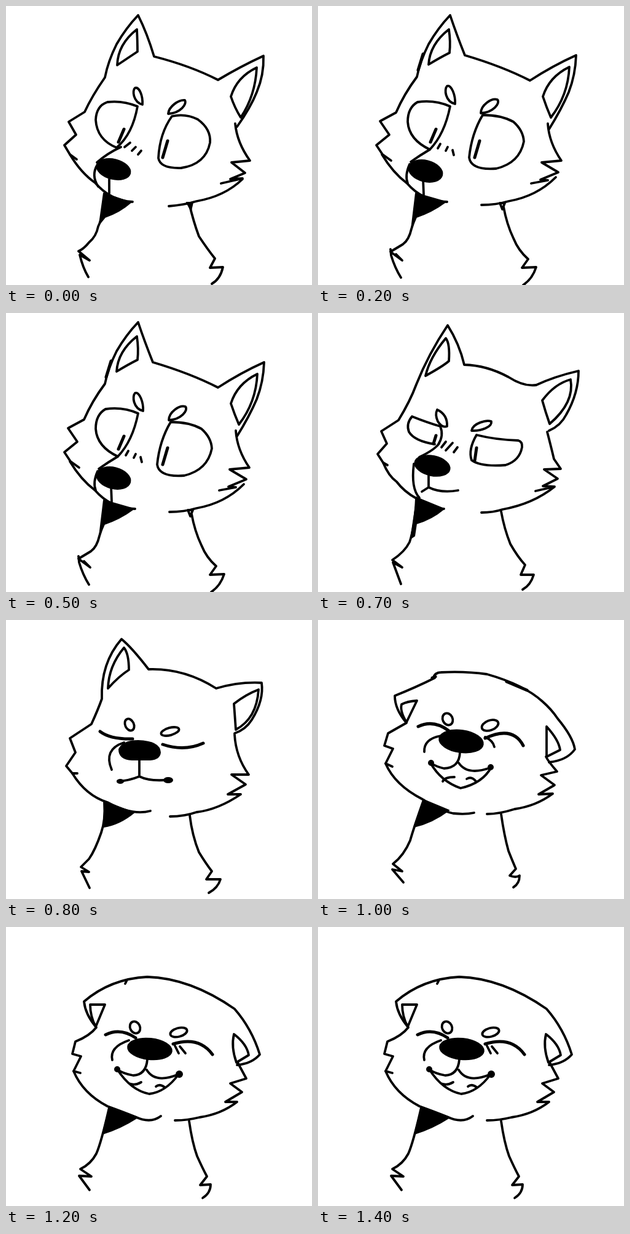
Animation of 498 by 453 pixels, one loop 1.5 s. Source, as an HTML page:

```html
<!DOCTYPE html>
<html lang="en">
<head>
<meta charset="utf-8">
<title>Wolf</title>
<style>
  html, body { margin: 0; width: 100%; height: 100%; overflow: hidden; background: #fff; }
  svg { display: block; width: 100vw; height: 100vh; }
  g { fill: none; stroke: #000; stroke-width: 3.8; stroke-linecap: round; stroke-linejoin: round; }
  .ink { fill: #000; stroke-width: 2; }
  .bold { stroke-width: 5; }
  .off { display: none; }
</style>
</head>
<body>
<svg viewBox="0 0 498 453">
  <!-- looking down -->
  <g>
    <path d="M115 249L104 241L95 226L114 209L102 188L128 172Q140 146 161 116Q166 90 180 62Q195 36 215 15Q230 45 241 82Q300 97 345 120Q382 98 419 81Q420 112 408 140Q398 165 376 196"/>
    <path d="M213 38Q214 58 214 74L181 96Q182 62 213 38ZM408 100Q406 145 382 181Q372 165 366 147Q376 115 408 100Z"/>
    <path d="M373 191Q376 222 397 251L367 254L389 271L365 281L385 280L350 288M385 281Q356 309 310 317Q290 323 265 325M104 241Q122 271 145 287Q170 316 206 318"/>
    <path d="M222 160C207 156 205 137 210 133C217 131 223 146 222 160ZM264 175C265 163 281 152 291 153C295 159 284 174 264 175Z"/>
    <path d="M214 163Q190 153 165 156Q147 162 146 185Q148 217 180 230Q206 208 214 163ZM270 179Q292 174 312 184Q334 200 332 222Q325 257 285 263Q251 264 248 247Q250 207 270 179Z"/>
    <path class="bold" d="M192 200L183 221M263 219L255 246"/>
    <path d="M202 222L193 229M211 229L205 235M220 235L215 241M187 229Q165 239 148 254M149 257Q138 275 150 293M168 281V304"/>
    <ellipse class="ink" cx="175" cy="265" rx="28" ry="16" transform="rotate(14 175 265)"/>
    <path class="ink" d="M159 304L203 319Q185 335 161 343L152 354ZM294 319H304L301 332Z"/>
    <path d="M161 304Q159 340 150 358Q147 374 135 384Q126 395 118 398L136 413L120 404Q125 425 134 440M298 320Q305 350 314 374Q328 395 340 410L332 425L353 424Q349 443 335 451"/>
  </g>
  <g>
    <path d="M119 251L105 241L95 226L116 209L101 187L127 173Q140 143 161 115Q166 90 180 62Q195 36 215 15Q225 45 239 80Q300 98 345 121Q382 97 420 80Q419 112 408 140Q396 168 376 200"/>
    <path d="M213 38Q216 58 214 76Q198 84 180 95Q182 62 213 38ZM409 99Q407 145 379 181Q372 165 366 147Q376 115 409 99Z"/>
    <path class="bold" d="M171 78L163 104"/>
    <path d="M374 191Q376 222 396 251L364 254L391 270L362 282L374 283L347 288M387 278Q356 309 310 317Q290 323 266 323M104 241Q122 271 145 288Q170 317 210 318"/>
    <path d="M223 159C207 155 205 135 210 130C217 127 224 145 223 159ZM265 174C265 161 282 149 292 152C297 158 285 173 265 174Z"/>
    <path d="M215 163Q190 152 162 156Q146 165 146 188Q148 217 182 233Q206 208 215 163ZM268 177Q298 177 318 188Q334 202 335 220Q328 255 290 264Q249 267 246 246Q250 207 268 177Z"/>
    <path class="bold" d="M192 200L183 221M263 219L255 246"/>
    <path d="M199 224L195 231M211 229L208 235M219 234L221 242M182 233Q165 243 151 253M149 257Q141 275 146 288M171 281L172 306"/>
    <ellipse class="ink" cx="175" cy="268" rx="28" ry="17" transform="rotate(14 175 268)"/>
    <path class="ink" d="M159 304L208 318Q185 335 160 343L152 362Z"/>
    <path d="M161 304Q159 343 152 362Q148 380 138 387L118 399L137 413L127 403M118 395L119 405Q125 425 135 441M296 320H304L300 330ZM302 326Q307 354 318 377Q326 397 342 411L332 425L355 424Q349 443 334 453"/>
  </g>
  <!-- lids lowering -->
  <g>
    <path d="M113 247L106 243L97 229L112 212L103 192L131 174Q150 143 160 116Q180 66 211 20Q230 50 238 84Q275 85 310 104Q335 120 355 117Q385 103 424 94Q424 130 404 165Q395 183 376 191"/>
    <path d="M208 41Q215 50 213 78Q204 86 175 102Q182 72 208 41ZM411 108Q418 145 377 180Q370 160 365 142Q385 115 411 108Z"/>
    <path d="M373 193Q380 220 384 237L395 253L368 254L390 269L366 281L385 282L354 289M385 282Q350 310 300 319Q285 324 266 324M106 243Q115 265 128 274Q140 290 160 301Q185 317 205 318"/>
    <path d="M194 157Q190 165 195 176Q202 187 210 184Q211 165 194 157ZM250 191C252 179 274 173 282 176C284 185 265 192 250 191Z"/>
    <path d="M190 213Q157 208 148 193Q143 180 153 168Q178 178 199 184Q205 199 196 213M258 198Q290 206 326 207Q333 209 332 218Q328 240 305 247Q265 250 250 239Q244 222 258 198Z"/>
    <path class="bold" d="M192 199L188 212M258 219L255 240"/>
    <path d="M208 209L201 218M219 211L208 223M227 218L221 226M197 212Q190 222 165 234M156 245Q151 285 165 300M180 264V283L169 290M180 283Q200 293 228 288"/>
    <ellipse class="ink" cx="186" cy="248" rx="29" ry="16" transform="rotate(12 186 248)"/>
    <path class="ink" d="M161 300L205 318Q185 335 160 342L157 362L151 366Z"/>
    <path d="M160 300Q158 345 149 372Q141 388 121 401L137 413L122 405L135 440M298 322Q303 350 313 375Q325 396 337 409L330 425L351 425Q346 442 333 449"/>
  </g>
  <!-- eyes shut -->
  <g>
    <path d="M116 249L108 249L98 237L113 215L104 192L139 169Q150 145 156 128Q154 70 188 31Q205 45 232 80Q290 78 342 111Q380 100 416 102Q420 130 400 162Q390 178 372 184"/>
    <path d="M192 45Q200 55 200 81Q184 91 166 111Q167 75 192 45ZM411 113Q390 121 371 136L374 178Q408 160 411 113Z"/>
    <path d="M372 186Q374 222 395 251L367 251L390 267L361 283L382 283Q345 308 310 312Q290 319 267 319M108 249Q130 285 165 296Q205 318 235 310"/>
    <ellipse cx="201" cy="170" rx="7" ry="10" transform="rotate(-25 201 170)"/>
    <ellipse cx="267" cy="181" rx="15" ry="6" transform="rotate(-15 267 181)"/>
    <path class="bold" d="M153 181Q170 194 206 193M255 202Q290 214 321 200"/>
    <path class="ink" d="M184 210Q190 196 215 196Q250 197 251 215Q250 226 235 227H205Q184 226 184 210Z"/>
    <path d="M192 199Q158 210 172 243M217 227V254M182 262Q200 261 217 254Q235 263 269 259"/>
    <ellipse class="ink" cx="186" cy="262" rx="5" ry="3"/>
    <ellipse class="ink" cx="264" cy="260" rx="7" ry="4"/>
    <path class="ink" d="M161 295L208 313Q185 332 159 336Z"/>
    <path d="M160 296Q162 325 155 345Q145 374 135 388L122 401L135 409L123 408L136 435M299 317Q303 350 314 377Q325 395 335 408L326 421L349 421Q345 435 330 443"/>
  </g>
  <!-- grin -->
  <g>
    <path d="M121 238L110 233L122 209L108 204L114 184L144 167Q125 145 125 123Q160 109 190 94M187 95Q190 85 200 85Q240 83 275 88Q335 105 365 132Q380 145 390 160Q415 190 418 210Q405 228 376 231"/>
    <path d="M161 131L144 166Q133 148 136 137Q145 132 161 131ZM372 173Q392 195 394 211L372 222Z"/>
    <path class="bold" d="M307 100L340 114M186 94L191 92"/>
    <path d="M371 222Q375 230 389 246L363 252L385 268L359 283L382 282Q355 302 320 307Q295 315 275 315M110 233Q125 268 170 291Q200 310 220 314Q240 316 254 313"/>
    <ellipse cx="211" cy="161" rx="8" ry="10" transform="rotate(-25 211 161)"/>
    <ellipse cx="280" cy="171" rx="14" ry="8" transform="rotate(-20 280 171)"/>
    <path class="bold" d="M163 173Q188 161 213 180M272 192Q317 171 334 204"/>
    <ellipse class="ink" cx="233" cy="197" rx="36" ry="18" transform="rotate(8 233 197)"/>
    <path d="M200 188Q172 193 173 214M272 190Q285 196 287 206M231 215Q230 240 205 241Q192 238 183 232M229 232Q243 253 280 240M183 232Q200 262 232 273Q268 265 282 239M203 262Q206 255 222 255M242 258Q250 253 257 262"/>
    <circle class="ink" cx="184" cy="232" r="4"/>
    <circle class="ink" cx="281" cy="239" r="4"/>
    <path class="ink" d="M172 292L213 309Q185 330 156 336Z"/>
    <path d="M172 292Q155 340 150 358Q140 382 122 396L137 408L121 405L139 426M298 315Q303 350 310 375Q318 395 322 404L312 415Q322 419 328 415Q328 428 318 434"/>
  </g>
  <g>
    <path d="M121 237L110 234L122 210L108 206L113 186Q136 177 147 163Q129 142 127 121Q170 84 230 81Q300 83 372 133Q400 165 413 207Q400 222 376 224M197 86L194 92"/>
    <path d="M137 126H161L146 162Q137 145 137 126ZM371 174Q392 190 395 208L375 220Q366 195 371 174Z"/>
    <path d="M377 220L391 246L365 254L384 268L357 284L376 284Q350 304 315 309Q295 314 275 314M110 234Q125 270 165 291Q190 300 210 308Q235 320 252 307"/>
    <ellipse cx="210" cy="163" rx="8" ry="10" transform="rotate(-25 210 163)"/>
    <ellipse cx="281" cy="171" rx="14" ry="7" transform="rotate(-15 281 171)"/>
    <path class="bold" d="M162 175Q186 163 211 180M272 190Q314 177 336 207"/>
    <ellipse class="ink" cx="234" cy="198" rx="36" ry="17" transform="rotate(6 234 198)"/>
    <path d="M200 184Q168 195 173 216M275 193L281 205M283 194L292 205M230 215Q228 240 207 241Q190 238 181 231M229 232Q243 255 281 239M181 231Q203 265 233 271Q260 268 281 239M200 254Q210 258 220 252M244 259Q250 254 258 260"/>
    <circle class="ink" cx="181" cy="231" r="4"/>
    <circle class="ink" cx="282" cy="239" r="5"/>
    <path class="ink" d="M168 293L213 310Q185 328 157 336Z"/>
    <path d="M168 293Q155 350 147 368Q138 385 121 393L139 405L119 404L136 427M298 315Q303 350 311 372Q320 392 327 405L316 419L333 418Q333 432 320 440"/>
  </g>
</svg>
<script>
  const LOOP = 1500;
  const poses = [...document.querySelectorAll('g')];
  const starts = [0, 200, 600, 800, 1000, 1200];

  function draw(now) {
    const time = now % LOOP;
    const current = starts.findLastIndex(start => time >= start);
    poses.forEach((pose, i) => pose.classList.toggle('off', i !== current));
  }

  function tick() {
    draw(performance.now());
    requestAnimationFrame(tick);
  }
  tick();
</script>
</body>
</html>
```
